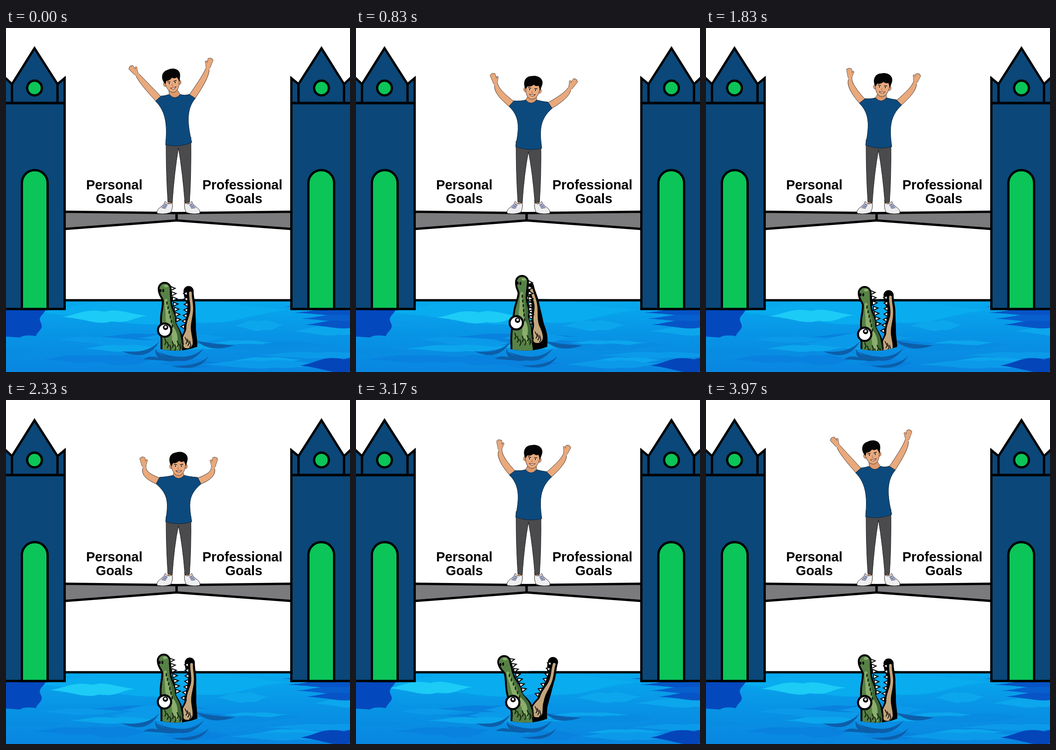
These frames come from a looping animation (748 px wide and 748 px high, 4.01 s). An HTML page with a canvas:

```html
<!DOCTYPE html>
<html lang="en">
<head>
<meta charset="utf-8">
<title>Goals bridge</title>
<style>
html, body { margin: 0; width: 100%; height: 100%; overflow: hidden; background: #fff; }
canvas { position: absolute; left: 0; top: 0; }
p { position: absolute; top: 326px; margin: 0; width: 200px; text-align: center; color: #000;
  font: bold 29px/30px "Liberation Sans", Arial, sans-serif; }
span { position: relative; left: 3px; }
</style>
</head>
<body>
<canvas id="c" width="748" height="748"></canvas>
<p style="left:135.5px">Personal<br>Goals</p>
<p style="left:414px">Professional<br><span>Goals</span></p>
<script>
const g = document.getElementById('c').getContext('2d');
const LOOP = 4010, CHEER = LOOP / 3, BITE = LOOP / 2, TAU = Math.PI * 2;
const SKIN = '#e9a97c', INK = '#2b211c', SHIRT = '#0c4a7e';
const { sin, cos, min, max, abs, PI } = Math;

const mix = (a, b, s) => a + (b - a) * s;
const clamp = v => min(1, max(0, v));
const ease = s => (1 - cos(PI * s)) / 2;
const noise = i => { const v = sin(i * 127.1) * 43758.5; return v - Math.floor(v); };

function paint(fill, line, width = 1) {
  if (fill) { g.fillStyle = fill; g.fill(); }
  if (line) { g.strokeStyle = line; g.lineWidth = width; g.stroke(); }
}
function poly(pts, open) {
  g.beginPath();
  for (let i = 0; i < pts.length; i += 2) g.lineTo(pts[i], pts[i + 1]);
  if (!open) g.closePath();
}
function oval(x, y, rx, ry = rx) {
  g.beginPath();
  g.ellipse(x, y, rx, ry, 0, 0, TAU);
}
function mirrored(axis, draw) {
  g.save();
  g.translate(axis, 0);
  g.scale(-1, 1);
  draw();
  g.restore();
}
function bothSides(axis, draw) {
  draw();
  mirrored(axis, draw);
}

// pointed wavy patch of water
function streak(x, y, w, h, color) {
  g.beginPath();
  g.moveTo(x - w / 2, y);
  g.bezierCurveTo(x - w * .3, y - h * .2, x - w * .25, y - h * .75, x, y - h * .45);
  g.bezierCurveTo(x + w * .15, y - h * .8, x + w * .3, y - h * .2, x + w / 2, y - h * .1);
  g.bezierCurveTo(x + w * .3, y + h * .1, x + w * .3, y + h * .6, x + w * .08, y + h * .4);
  g.bezierCurveTo(x - w * .1, y + h * .75, x - w * .2, y + h * .2, x - w / 2, y);
  paint(color);
}

function water(t) {
  const a = t / LOOP * TAU;
  const fill = g.createLinearGradient(0, 592, 0, 748);
  fill.addColorStop(0, '#08aaee');
  fill.addColorStop(.45, '#0895e6');
  fill.addColorStop(1, '#0986e0');
  g.fillStyle = fill;
  g.fillRect(0, 592, 748, 156);
  const tints = ['#0b9ae9', '#0882de', '#0ca6ed', '#088ce2'];
  for (let i = 0; i < 24; i++) {
    const p = a + i * 2.4;
    streak(noise(i) * 748 + 28 * sin(p), 642 + noise(i + 40) * 100,
      (120 + 150 * noise(i + 80)) * (1 + .15 * sin(2 * p)), 10 + 12 * noise(i + 120), tints[i % 4]);
  }
  streak(340, 618, 560, 52, '#08acef');
  streak(215 + 55 * sin(a), 628 + 3 * sin(a * 2), 185, 25, '#1ccbf6');

  // dark shadows under both towers and in the corner
  g.beginPath();
  g.moveTo(0, 606);
  for (let y = 606; y <= 670; y += 2) g.lineTo(82 - (y - 612) * .22 + 4 * sin(y / 6), y);
  g.quadraticCurveTo(40, 666, 30, 673);
  g.lineTo(0, 671);
  paint('#0448bd');
  for (let i = 0; i < 4; i++)
    streak(740 + 8 * sin(a + i), 606 + i * 13, 270 - i * 30, 16, i % 2 ? '#0754c6' : '#075fce');
  streak(735, 734, 190, 30, '#0445ba');
}

function tower() {
  const blue = '#0b4778';
  poly([-4, 163, -4, 106, 13, 122, 62, 44, 112, 122, 127.5, 109, 127.5, 163]);
  paint(blue, '#000', 5);
  for (const x of [13, 112]) {
    poly([x, 121, x, 163], true);
    paint(null, '#000', 5);
  }
  poly([-4, 163.5, 127.5, 163.5, 127.5, 611, -4, 611]);
  paint(blue, '#000', 5);
  g.beginPath();
  g.moveTo(34.5, 611);
  g.arc(62.5, 337, 28, PI, TAU);
  g.lineTo(90.5, 611);
  g.closePath();
  paint('#0bc559', '#000', 5);
  oval(62, 130.5, 16);
  paint('#0bc559', '#000', 5);
}

function deck(x) {
  poly([x, 399.5, 371, 402.5, 371, 418.5, x, 437]);
  paint('#7b7a7d', '#000', 5);
}

// tapered dark curl on the water
function curl(x0, y0, cx, cy, x1, y1, thick) {
  g.beginPath();
  g.moveTo(x0, y0);
  g.quadraticCurveTo(cx, cy - thick, x1, y1);
  g.quadraticCurveTo(cx, cy + thick, x0, y0);
  paint('#0c5ea9');
}
function ripples(t) {
  const s = 1 + .038 * cos((t - 240) / BITE * TAU);
  g.save();
  g.translate(375, 704);
  g.scale(s, s);
  curl(-119, -1, -66, 14, -40, -22, 9);
  curl(-74, 16, -56, 10, -28, 19, 7);
  curl(-46, -20, -62, 22, 14, 16, 11);
  curl(-44, 0, 20, 34, 54, -8, 9);
  curl(-16, 30, 44, 38, 64, 9, 7);
  curl(38, -24, 66, -6, 119, -14, 10);
  g.restore();
}

// time, jaw opening in degrees, lift in px
const bites = [[0, 0, 0], [325, 1, -1], [830, -8, -12], [1165, 12, -6],
  [1430, -8, -22], [1830, 0, 9], [BITE, 0, 0]];
function bite(t) {
  const i = bites.findIndex(k => k[0] > t);
  const a = bites[i - 1], b = bites[i];
  const s = ease((t - a[0]) / (b[0] - a[0]));
  return [mix(a[1], b[1], s), mix(a[2], b[2], s)];
}

// turns a point about (px, 0), fading out towards the water
function bend(x, y, px, deg) {
  const a = deg * PI / 180 * clamp((20 - y) / 40);
  return [px + (x - px) * cos(a) - y * sin(a), y * cos(a) + (x - px) * sin(a)];
}
// row of discs along [x, y, radius] knots
function tube(knots, px, deg, color, grow = 0) {
  g.beginPath();
  for (let i = 0; i + 1 < knots.length; i++)
    for (let s = 0; s <= 1; s += .04) {
      const e = ease(s), a = knots[i], b = knots[i + 1];
      const [x, y] = bend(mix(a[0], b[0], e), mix(a[1], b[1], s), px, deg);
      const r = mix(a[2], b[2], e) + grow;
      g.moveTo(x + r, y);
      g.arc(x, y, r, 0, TAU);
    }
  paint(color);
}
function teeth(count, place, reach, px, deg) {
  for (let i = 0; i < count; i++) {
    const [x, y] = place(i / (count - 1));
    poly([...bend(x, y - 5, px, deg), ...bend(x + reach, y - 1, px, deg), ...bend(x, y + 4, px, deg)]);
    paint('#fff', '#000', 2);
  }
}

function lowerJaw(deg) {
  tube([[22, -108, 10], [28, -70, 8], [26, -30, 11], [22, 10, 18], [22, 50, 18]], 25, deg, '#000', 1);
  tube([[26, -104, 3], [29, -70, 3], [22, -28, 5], [19, 6, 12]], 25, deg, '#c3a67c');
  teeth(7, s => [mix(19, 13, s) + 4 * sin(s * PI), mix(-102, -30, s)], -8, 25, deg);
  for (let i = 0; i < 3; i++) {
    poly([14 + i * 5, -8 + i * 4, 19 + i * 4, 2 + i * 4, 16 + i * 4, 7 + i * 4], true);
    paint(null, '#000', 1.6);
  }
}

function upperJaw(deg) {
  const spine = [[-30, -113, 13], [-25, -86, 9], [-23, -45, 15], [-14, 6, 23], [-12, 50, 25]];
  teeth(7, s => [mix(-17, -5, s), mix(-113, -45, s)], 10, 0, deg);
  tube(spine, 0, deg, '#000', 2);
  tube(spine, 0, deg, '#578246', -2);
  tube([[-18, -84, 1], [-10, -45, 3], [0, -8, 5], [4, 14, 5]], 0, deg, '#3f6737');
  tube([[-27, -88, 3], [-23, -50, 5], [-8, -6, 6], [-4, 14, 4]], 0, deg, '#8bae6c');
  const spot = (x, y, rx, ry, color, line) => {
    oval(...bend(x, y, 0, deg), rx, ry);
    paint(color, line, 4.5);
  };
  spot(-27, -119, 5, 3, '#8bae6c');
  for (const x of [-39, -33]) spot(x, -109, 2, 3.4, '#000');
  for (let i = 0; i < 6; i++) spot(-25 + i * 2.4, -82 + i * 10, 1.6, 4, '#1d2b18');
  for (let i = 0; i < 8; i++) {
    const x = -30 + i * 5.4, y = -1 + i * 7 % 15;
    poly([x, y - 4, x + 3, y + 4, x, y + 10], true);
    paint(null, '#16210f', 2.2);
  }
  spot(-30, -23, 14.5, 14.5, '#fff', '#000');
  spot(-28, -29, 5.8, 5.8, '#000');
  spot(-28, -30, 2.6, 2.6, '#fff');
}

function croc(t) {
  const [open, lift] = bite(t % BITE);
  g.save();
  g.beginPath();
  g.moveTo(280, 480);
  g.lineTo(280, 690);
  g.lineTo(336, 698);
  g.quadraticCurveTo(380, 707, 416, 693);
  g.lineTo(480, 690);
  g.lineTo(480, 480);
  g.clip();
  g.translate(375, 680 + lift);
  lowerJaw(open * 1.4);
  upperJaw(-open);
  g.restore();
}

function shoe() {
  poly([352, 374, 362, 374, 361, 387, 353, 387]);
  paint(SKIN, INK, .7);
  g.beginPath();
  g.moveTo(346, 377);
  g.bezierCurveTo(343, 388, 329, 391, 328, 400);
  g.lineTo(329, 403);
  g.quadraticCurveTo(345, 406, 358, 401);
  g.quadraticCurveTo(364, 390, 361, 380);
  g.quadraticCurveTo(353, 386, 346, 377);
  g.closePath();
  paint('#eeeef0', INK, 1);
  poly([345, 380, 352, 384, 347, 393, 337, 391]);
  paint('#a7abc8');
  for (let i = 0; i < 3; i++) {
    poly([345 - i * 3, 383 + i * 4, 351 - i * 2, 386 + i * 3], true);
    paint(null, '#46506e', 1);
  }
}

function legs(hemL, hemR) {
  const fork = (hemL + hemR) / 2 + 9;
  g.beginPath();
  g.moveTo(348, hemL - 12);
  g.quadraticCurveTo(348, 320, 352, 378);
  g.lineTo(361.5, 380);
  g.quadraticCurveTo(366, 315, 375, fork);
  g.quadraticCurveTo(384, 315, 389, 380);
  g.lineTo(399, 379);
  g.quadraticCurveTo(403, 320, 402, hemR - 12);
  g.closePath();
  paint('#4b4a4c', '#1c1c1d', 1);
}

// left arm at a phase of the cheer; the right arm is its mirror half a cycle later
function joints(phase) {
  const lean = cos(phase), fan = sin(2 * phase), bob = .3 * fan - cos(2 * phase);
  return [
    [334 - 4 * bob - 7 * lean, 163 + 12 * bob + 2.5 * lean],
    [310 - 2.5 * bob - 9.5 * lean - 2 * fan, 140.5 + 22.5 * bob + 5 * lean],
    [300 + bob - 13 * lean - 5 * fan, 121 + 25.5 * bob + 6.5 * lean],
    [291 + 4.5 * bob - 17.5 * lean - 9 * fan, 98 + 24.5 * bob + 9 * lean]];
}
function dir([x0, y0], [x1, y1]) {
  const d = Math.hypot(x1 - x0, y1 - y0);
  return [(x1 - x0) / d, (y1 - y0) / d];
}
const beside = ([x, y], [dx, dy], k) => [x - dy * k, y + dx * k];

function arm([s, e, w, tip]) {
  const upper = dir(s, e), mid = dir(s, w), fore = dir(e, w);
  const root = [s[0] - upper[0] * 6, s[1] - upper[1] * 6];
  const edge = k => [beside(root, upper, 7.5 * k), beside(e, mid, 6.5 * k), beside(w, fore, 4 * k)];
  const p = edge(1), q = edge(-1);
  const bow = c => [0, 1].map(i => 2 * c[1][i] - (c[0][i] + c[2][i]) / 2);
  g.beginPath();
  g.moveTo(...p[0]);
  g.quadraticCurveTo(...bow(p), ...p[2]);
  g.lineTo(...q[2]);
  g.quadraticCurveTo(...bow(q), ...q[0]);
  paint(SKIN, INK, .9);

  const len = Math.hypot(tip[0] - w[0], tip[1] - w[1]);
  g.save();
  g.translate(...w);
  g.rotate(Math.atan2(tip[1] - w[1], tip[0] - w[0]));
  g.lineCap = 'round';
  for (const [color, extra] of [[INK, 1.2], [SKIN, 0]]) {
    for (let k = -1.5; k < 2; k++) {
      poly([7, k * 2, len - 2 - abs(k) * 1.6, k * 2.7], true);
      paint(null, color, 3 + extra);
    }
    poly([3, 2, 9, 5, 14, 8], true);
    paint(null, color, 3.2 + extra);
    oval(6.5, 0, 6.5 + extra / 2, 4.6 + extra / 2);
    paint(color);
  }
  oval(-1, 0, 4, 3.6);
  paint(SKIN);
  g.restore();
}

function shirt(hemL, hemR, cx, cy, left, right) {
  const cuff = ([s, e], k) => beside(s, dir(s, e), 8 * k);
  const flip = ([x, y]) => [750 - x, y];
  const l1 = cuff(left, 1), l2 = cuff(left, -1);
  const r1 = flip(cuff(right, 1)), r2 = flip(cuff(right, -1)), lean = cx - 375;
  g.beginPath();
  g.moveTo(cx - 12, cy - 3);
  g.quadraticCurveTo(cx - 22, cy, ...l1);
  g.lineTo(...l2);
  g.bezierCurveTo(354 + lean * .6, l2[1] + 24, 353 + lean * .3, hemL - 40, 347, hemL);
  g.quadraticCurveTo(376, (hemL + hemR) / 2 + 9, 404, hemR);
  g.bezierCurveTo(397 + lean * .3, hemR - 40, 396 + lean * .6, r2[1] + 24, ...r2);
  g.lineTo(...r1);
  g.quadraticCurveTo(cx + 22, cy, cx + 12, cy - 3);
  g.quadraticCurveTo(cx, cy + 11, cx - 12, cy - 3);
  paint(SHIRT, '#0a2238', 1);
}

function head(x, y, tilt) {
  g.save();
  g.translate(x, y);
  g.rotate(tilt);
  for (const s of [-1, 1]) {
    oval(16 * s, 3, 3, 5);
    paint(SKIN, INK, .8);
  }
  g.beginPath();
  g.moveTo(-15, -12);
  g.bezierCurveTo(-18, 12, -8, 23, 0, 23);
  g.bezierCurveTo(8, 23, 18, 12, 15, -12);
  g.closePath();
  paint(SKIN, INK, .8);
  g.beginPath();
  g.moveTo(-15, 3);
  g.bezierCurveTo(-24, -10, -20, -25, -6, -27);
  g.bezierCurveTo(8, -32, 24, -24, 19, -8);
  g.lineTo(16, 3);
  g.quadraticCurveTo(15, -3, 12, -8);
  g.quadraticCurveTo(6, -5, 1, -9);
  g.quadraticCurveTo(-4, -3, -12, -4);
  g.closePath();
  paint('#050505');
  for (const s of [-1, 1]) {
    oval(6.5 * s, 2.5, 2.6, 1.5);
    paint('#fff');
    oval(6.5 * s, 2.5, 1.5);
    paint('#1a1210');
    poly([3.5 * s, -.5, 10 * s, -1.5], true);
    paint(null, '#15100d', 1.4);
  }
  poly([0, 4, -1.5, 9, 1.5, 9], true);
  paint(null, '#a9663f', .9);
  g.beginPath();
  g.moveTo(-6, 12.5);
  g.quadraticCurveTo(0, 14, 7, 12);
  g.quadraticCurveTo(1, 20, -6, 12.5);
  paint('#fff', '#5c2318', 1);
  g.restore();
}

function man(t) {
  const phase = t / CHEER * TAU, lean = cos(phase);
  const bob = .3 * sin(2 * phase) - cos(2 * phase);
  const cx = 375 - 8 * lean, cy = 157 + 9.5 * bob;
  const hx = 374.5 - 13.5 * lean, hy = 129 + 12 * bob;
  const hem = 258 + 6.5 * bob, hemL = hem + 2.5 * lean, hemR = hem - 2.5 * lean;
  const left = joints(phase), right = joints(phase + PI);
  bothSides(750, shoe);
  legs(hemL, hemR);
  arm(left);
  mirrored(750, () => arm(right));
  poly([hx - 8, hy + 12, hx + 8, hy + 12, cx + 12, cy - 3, cx + 6, cy + 5, cx - 6, cy + 5, cx - 12, cy - 3]);
  paint('#dc9a6d', INK, .7);
  shirt(hemL, hemR, cx, cy, left, right);
  head(hx, hy, -.16 * lean);
}

function draw(t) {
  g.fillStyle = '#fff';
  g.fillRect(0, 0, 748, 748);
  water(t);
  poly([128, 592, 620, 592], true);
  paint(null, '#000', 5);
  deck(127);
  deck(621);
  bothSides(748, tower);
  ripples(t);
  croc(t);
  man(t);
}

const start = performance.now();
function tick() {
  draw((performance.now() - start) % LOOP);
  requestAnimationFrame(tick);
}
tick();
</script>
</body>
</html>
```
